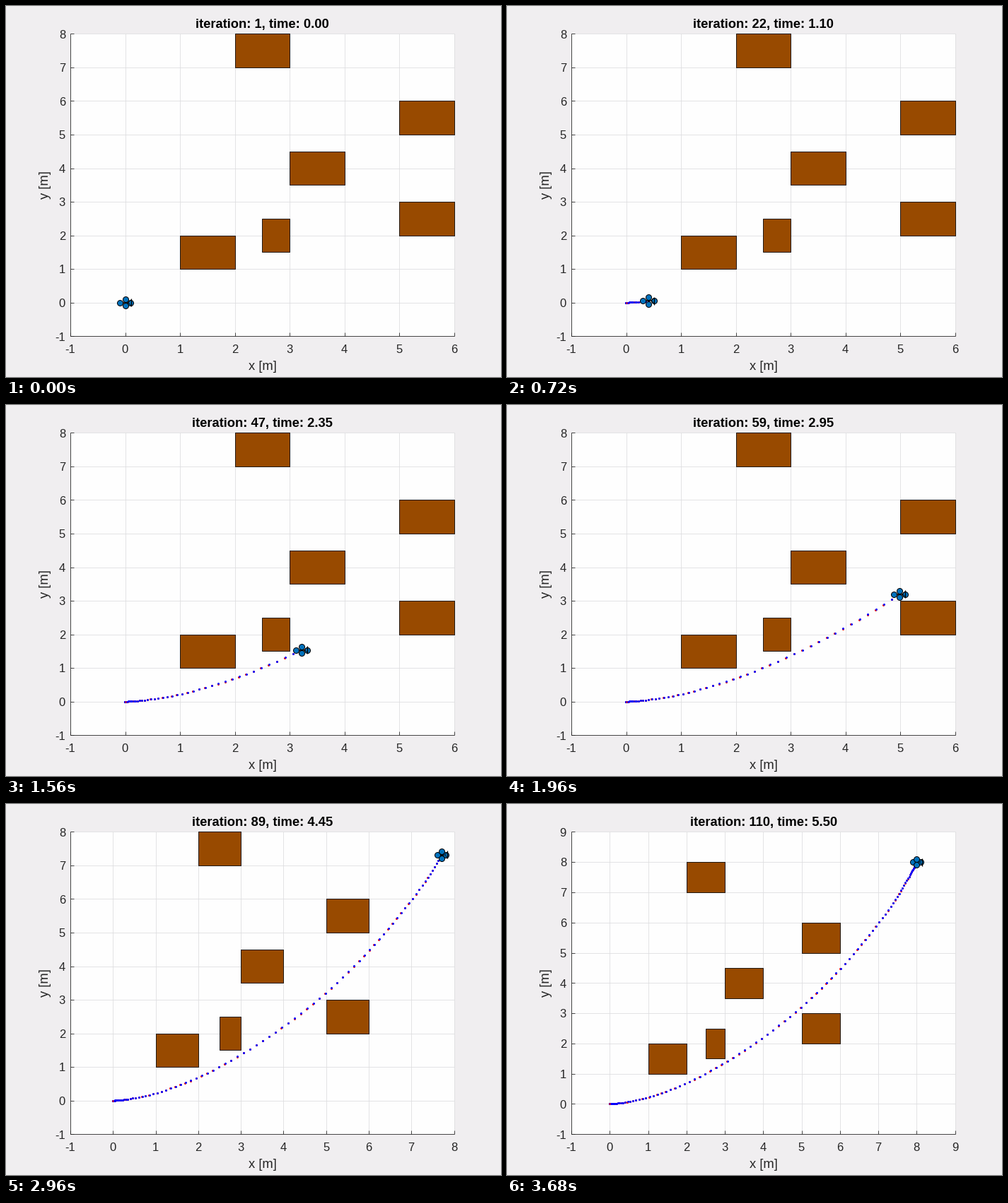
These frames come from a looping animation (700x525 px, 3720 ms). A matplotlib script:

```python
import math

import matplotlib.pyplot as plt
import numpy as np
from matplotlib.animation import FuncAnimation
from matplotlib.patches import Rectangle

W, H, DPI = 700, 525, 100
FRAMES, INTERVAL = 93, 40
STEP = 0.05            # simulated seconds per iteration
RATE = 1.2             # iterations per frame
LEFT, RIGHT, TOP, BOTTOM = 91, 633.5, 39.4, 467.25
ARM = 0.1
PT = 72 / DPI          # points per pixel

PAPER, GRID, INK = "#f0eef0", "#dedee0", "#262626"
BROWN, BODY = "#984a00", "#0072bd"

plt.rcParams["font.family"] = "Liberation Sans"

# x, y, width, height of each obstacle in metres
OBSTACLES = [(1, 1, 1, 1), (2.5, 1.5, 0.5, 1), (3, 3.5, 1, 1),
             (5, 2, 1, 1), (5, 5, 1, 1), (2, 7, 1, 1)]

# Waypoints of the flight: iteration, x, y
WAY = np.array([
    (0, 0, 0), (10, 0.038, 0.003), (16, 0.156, 0.017), (22, 0.406, 0.056),
    (30, 1.039, 0.235), (40, 2.213, 0.822), (50, 3.665, 1.908),
    (59, 4.987, 3.2), (65, 5.777, 4.165), (70, 6.353, 4.966),
    (74, 6.757, 5.59), (80, 7.26, 6.41), (89, 7.709, 7.315),
    (100, 7.949, 7.86), (110, 7.997, 8.0)])
KNOTS, POINTS = WAY[:, 0], WAY[:, 1:]
SLOPES = np.gradient(POINTS, KNOTS, axis=0)
SLOPES[[0, -1]] = 0


def position(it):
    """Cubic Hermite path through the waypoints, in metres."""
    it = np.clip(np.atleast_1d(it), 0, KNOTS[-1])
    i = np.clip(np.searchsorted(KNOTS, it, "right") - 1, 0, len(KNOTS) - 2)
    h = (KNOTS[i + 1] - KNOTS[i])[:, None]
    s = (it - KNOTS[i])[:, None] / h
    return ((1 + 2 * s) * (1 - s) ** 2 * POINTS[i]
            + s * (1 - s) ** 2 * h * SLOPES[i]
            + s * s * (3 - 2 * s) * POINTS[i + 1]
            + s * s * (s - 1) * h * SLOPES[i + 1])


fig = plt.figure(figsize=(W / DPI, H / DPI), dpi=DPI, facecolor=PAPER)
ax = fig.add_axes([0, 0, 1, 1])


def line(xs, ys, color, width=0.83, z=1):
    ax.plot(xs, ys, color=color, lw=width * PT, zorder=z,
            solid_capstyle="butt")


def dots(xs, ys, color, size, z, edge="none"):
    ax.plot(xs, ys, "o", ms=size * PT, mfc=color, mec=edge,
            mew=1 * PT, zorder=z)


def label(x, y, text, px=16.67, color=INK, ha="center", **kw):
    ax.text(x, y, text, fontsize=px * PT, color=color, ha=ha, va="baseline",
            rotation_mode="anchor", **kw)


def draw_axes(px, py, xmax, ymax):
    ax.add_patch(Rectangle((LEFT, TOP), RIGHT - LEFT, BOTTOM - TOP,
                           fc="#fefefe", ec="none", zorder=0))
    for v in range(-1, xmax + 1):
        x = px(v)
        line([x, x], [TOP, BOTTOM], GRID)
        line([x, x], [BOTTOM - 5.4, BOTTOM], INK, z=6)
        label(x, 491, str(v))
    for v in range(-1, ymax + 1):
        y = py(v)
        line([LEFT, RIGHT], [y, y], GRID)
        line([LEFT, LEFT + 5.4], [y, y], INK, z=6)
        label(84, y + 6.3, str(v), ha="right")
    line([LEFT, LEFT], [TOP, BOTTOM], INK, z=6)
    line([LEFT, RIGHT], [BOTTOM, BOTTOM], INK, z=6)
    label((LEFT + RIGHT) / 2 + 0.5, 515, "x [m]", 18.33)
    label(60, (TOP + BOTTOM) / 2, "y [m]", 18.33, rotation=90)


def draw_quad(px, py, x, y):
    cx, cy = px(x), py(y)
    xs, ys = px(x + ARM * np.array([-1, 1])), py(y + ARM * np.array([-1, 1]))
    line(xs, [cy, cy], "black", 1.6, 7)
    line([cx, cx], ys, "black", 1.6, 7)
    dots([xs[0], xs[1], cx, cx], [cy, cy, ys[0], ys[1]], BODY, 8, 8, "black")
    # heading mark
    tip = cx + 8.3
    line([tip, tip], [cy - 5.5, cy + 5.5], "black", 1.3, 9)
    line([tip, tip - 4, tip], [cy - 4, cy, cy + 4], "black", 0.8, 9)


def draw(k):
    it = round(RATE * k)
    x, y = position(it)[0]
    xmax = max(6, math.ceil(x + ARM))
    ymax = max(8, math.ceil(y + ARM))

    def px(v):
        return LEFT + (v + 1) * (RIGHT - LEFT) / (xmax + 1)

    def py(v):
        return BOTTOM - (v + 1) * (BOTTOM - TOP) / (ymax + 1)

    ax.clear()
    ax.set_axis_off()
    ax.set(xlim=(0, W), ylim=(H, 0))
    draw_axes(px, py, xmax, ymax)
    for ox, oy, w, h in OBSTACLES:
        ax.add_patch(Rectangle((px(ox), py(oy)), px(ox + w) - px(ox),
                               py(oy + h) - py(oy), fc=BROWN, ec="black",
                               lw=0.83 * PT, zorder=3))

    # flown path in red, slightly behind the planned path in blue
    steps = np.arange(it + 1)
    for lag, color, z in ((0.06, "red", 4), (0, "blue", 5)):
        p = position(steps - lag)
        dots(px(p[:, 0]), py(p[:, 1]), color, 3, z)
    if it:
        dots([px(0)], [py(0)], "red", 2.4, 5.5)
    draw_quad(px, py, x, y)

    label((LEFT + RIGHT) / 2 + 0.5, 31,
          f"iteration: {max(it, 1)}, time: {it * STEP:.2f}",
          18.33, "black", weight="bold")
    return []


anim = FuncAnimation(fig, draw, frames=FRAMES, interval=INTERVAL,
                     init_func=lambda: [], repeat=True, repeat_delay=0)
plt.show()
```
